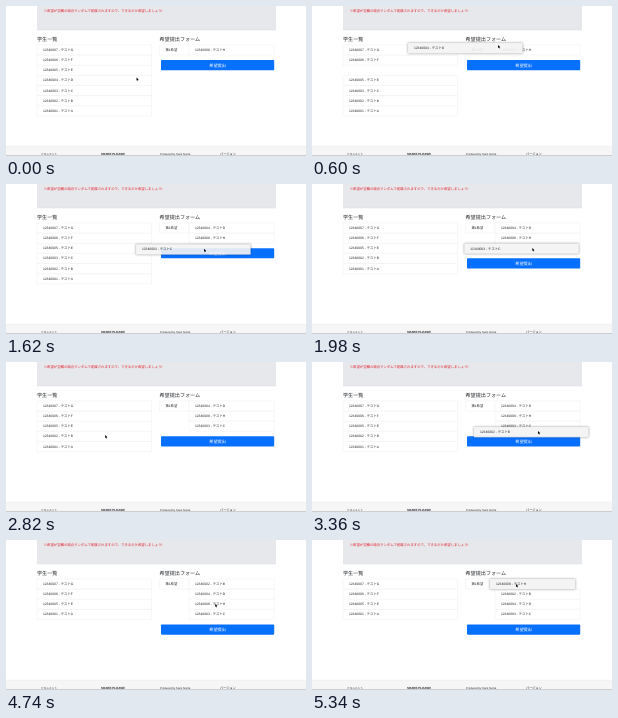
An HTML page that plays this animation: 300 by 150 pixels, repeating every 5400 ms.

```html
<!DOCTYPE html>
<html lang="ja">
<head>
<meta charset="utf-8">
<style>
  html, body { margin: 0; width: 100%; height: 100%; overflow: hidden; background: #fff; }
  svg { display: block; width: 100%; height: 100%; }
  text {
    font: 3.35px "Liberation Sans", "Noto Sans CJK JP", "Noto Sans CJK", sans-serif;
    fill: #212529; dominant-baseline: central; text-rendering: geometricPrecision;
  }
  .title { font-size: 5.1px; font-weight: 500; }
  .row rect { fill: #fff; stroke: #dfdfdf; stroke-width: .25px; }
  .drag rect { fill-opacity: .87; stroke: #ccc; filter: drop-shadow(0 .4px 1px rgba(0, 0, 0, .4)); }
</style>
</head>
<body>
<svg id="stage" viewBox="0 0 300 150"></svg>
<script>
const LOOP = 5400, TOP = 38.9, PITCH = 10.15, SHIFT_TIME = 200, DROP_X = 160;
const LEFT = { x: 31, w: 114.5 }, RIGHT = { x: 183, w: 85.2 };
const POINTER_START = [130.5, 71.5];

// Each row is lifted at `start`, its old place closes at `leave`, it lands at `end` in `slot`.
// `grip` is the pointer's place inside it; `gap` is the place it opens in its own list.
const drags = [
  { id: 4, start: 220, leave: 760, end: 1160, slot: 0, grip: [90, 2], gap: 2,
    via: [[600, 96, 37], [840, 122, 44.8]] },
  { id: 3, start: 1400, leave: 1700, end: 2160, slot: 2, grip: [68, 4.5],
    via: [[1620, 130, 60.3]] },
  { id: 2, start: 2900, leave: 3400, end: 4200, slot: 0, grip: [64, 4],
    via: [[3360, 162, 65], [3960, 161, 48.3]] },
  { id: 8, start: 4780, leave: 4780, end: LOOP, slot: 0, grip: [26, 5],
    via: [[5260, 178, 39.2]] }
];

const stage = document.getElementById('stage');
const slotY = slot => TOP + slot * PITCH;
const ease = p => { p = Math.min(1, Math.max(0, p)); return p * p * (3 - 2 * p); };
const mix = (a, b, p) => a.map((v, i) => v + (b[i] - v) * ease(p));

// Eased point on a track of [time, x, y] keys.
function sample(track, t) {
  const i = Math.max(1, track.findIndex(key => key[0] > t));
  const [from, ...a] = track[i - 1], [to, ...b] = track[i];
  return mix(a, b, (t - from) / (to - from));
}

function add(parent, tag, attrs, content) {
  const el = document.createElementNS('http://www.w3.org/2000/svg', tag);
  for (const key in attrs) el.setAttribute(key, attrs[key]);
  if (content) el.textContent = content;
  return parent.appendChild(el);
}
const box = (x, y, width, height, fill) => add(stage, 'rect', { x, y, width, height, fill });
const label = (x, y, content, style = '', cls = '') =>
  add(stage, 'text', { x, y, style, class: cls }, content);
const move = (el, x, y) => el.setAttribute('transform', `translate(${x} ${y})`);

function makeRow(content, width) {
  const el = add(stage, 'g', { class: 'row' });
  const rect = add(el, 'rect', { width, height: PITCH, rx: .4 });
  add(el, 'text', { x: 5.9, y: 5.1 }, content);
  return { el, rect };
}

// Fixed page parts
box(0, 0, 300, 150, '#fff');
box(31, -2, 239, 26, '#e7e8ec');
box(31, 23.8, 239, .4, '#d3d6db');
label(37.7, 5, '※希望が空欄の場合ランダムで配属されますので、できるだけ希望しましょう!', 'fill:#e0202c;font-size:3.38px');
label(31, 33.8, '学生一覧', '', 'title');
label(153.5, 33.8, '希望提出フォーム', '', 'title');
box(0, 140, 300, 10, '#f6f6f7');
box(0, 139.9, 300, .3, '#e2e2e4');
label(35, 148.4, 'ドキュメント', 'font-size:2.7px');
label(95, 148.4, 'SHARE PLEASE!', 'font-size:3px;font-weight:700');
label(154, 148.4, 'Produced by Team Norita', 'font-size:2.7px');
label(214, 148.4, 'バージョン', 'font-size:3.2px');
box(0, 149.5, 300, .5, '#a5a5a8');

const button = add(stage, 'g', {});
add(button, 'rect', { x: 155, width: 113.2, height: 10.2, rx: .8, fill: '#0870ff' });
add(button, 'text', { x: 211.6, y: 5.1, 'text-anchor': 'middle', style: 'fill:#fff;font-size:4.2px' }, '希望提出');
move(makeRow('第1希望', 29.5).el, 153.5, TOP);

const studentRow = id => makeRow(`1234000${id} - テスト${'ABCDEFGH'[id - 1]}`, LEFT.w);
const rows = {};
for (let id = 1; id <= 8; id++) rows[id] = studentRow(id);
for (const d of drags) {
  d.rest = studentRow(d.id).el;
  stage.append(rows[d.id].el);
}

const pointer = add(stage, 'path', {
  d: 'M0 0V3.1L.8 2.4L1.3 3.5L1.8 3.3L1.3 2.2H2.3Z',
  fill: '#000', stroke: '#fff', 'stroke-width': .25, 'paint-order': 'stroke'
});

function placeRow(id, home, x, y, dragging) {
  const { el, rect } = rows[id];
  el.setAttribute('class', dragging ? 'row drag' : 'row');
  rect.setAttribute('width', home.w);
  move(el, x, y);
  if (dragging && pointer.previousSibling !== el) stage.insertBefore(el, pointer);
}

function draw(t) {
  const left = [7, 6, 5, 4, 3, 2, 1], right = [8], offset = {};
  let tip, lastTip = POINTER_START, lastEnd = 0, opened = 0, carried;

  for (const d of drags) {
    const fromLeft = left.includes(d.id);
    const source = fromLeft ? left : right, home = fromLeft ? LEFT : RIGHT;
    const own = source.indexOf(d.id);
    const grab = [home.x, slotY(own)];
    const drop = [fromLeft ? DROP_X : d.via[0][1], slotY(d.slot)];
    const tipAt = point => point.map((v, i) => v + d.grip[i]);
    d.rest.style.display = 'none';

    if (t < d.start) {
      tip = mix(lastTip, tipAt(grab), (t - lastEnd) / (d.start - lastEnd));
      break;
    }
    if (fromLeft && t > d.leave) opened++;
    if (t < d.end) {
      const point = sample([[d.start, ...grab], ...d.via, [d.end, ...drop]], t);
      const left_ = ease((t - d.leave) / SHIFT_TIME);
      const lifted = ease((t - d.start - 160) / SHIFT_TIME);
      // Rows of the old list close up; rows of the form give way as the carried one passes.
      if (fromLeft) left.forEach((id, k) => {
        if (k > own) offset[id] = -left_;
        else if (k >= d.gap) offset[id] = lifted - left_;
      });
      right.forEach((id, k) => {
        if (fromLeft || k < own) offset[id] = left_ * ease((slotY(k + .6) - point[1]) / (PITCH * .6));
      });
      if (fromLeft && d.gap === undefined && t < d.leave) {
        d.rest.style.display = '';
        move(d.rest, ...grab);
      }
      tip = tipAt(point);
      carried = d.id;
      placeRow(d.id, home, ...point, true);
      break;
    }
    source.splice(own, 1);
    right.splice(d.slot, 0, d.id);
    lastTip = tipAt(drop);
    lastEnd = d.end;
  }

  for (const [list, home] of [[left, LEFT], [right, RIGHT]]) {
    list.forEach((id, k) => {
      if (id !== carried) placeRow(id, home, home.x, slotY(k + (offset[id] || 0)), false);
    });
  }
  move(button, 0, 54 + opened * PITCH);
  move(pointer, ...tip);
}

function tick() {
  draw(performance.now() % LOOP);
  requestAnimationFrame(tick);
}
for (const d of drags) d.rest.style.display = 'none';
tick();
</script>
</body>
</html>
```
